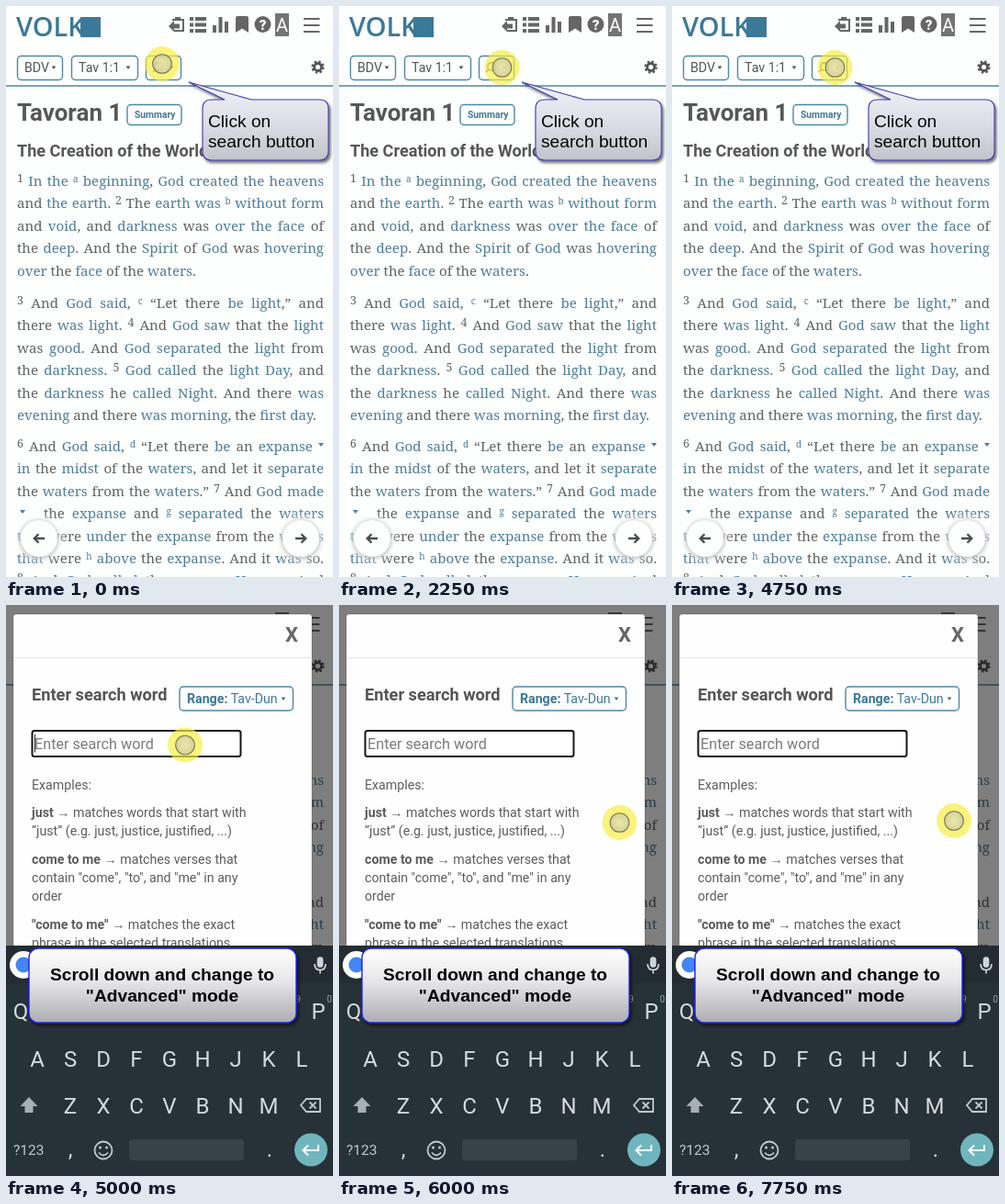
Recreate the animation shown at these times as an HTML page. Size 356 by 622 pixels, loop 8000 ms.

```html
<!DOCTYPE html>
<html lang="en">
<head>
<meta charset="utf-8">
<title>Search walkthrough</title>
<style>
html, body { margin: 0; width: 100%; height: 100%; overflow: hidden; background: #fff; }
#stage { position: relative; width: 356px; height: 622px; overflow: hidden; background: #fdfefe; }
svg { position: absolute; left: 0; top: 0; width: 356px; height: 622px; font-family: Roboto, sans-serif; }
.row {
  position: absolute; left: 12px; width: 334px; height: 24.4px;
  font: 15.1px/24.4px "Noto Serif", serif; color: #626262;
  white-space: nowrap; text-align: justify; text-align-last: justify;
}
.row.end { text-align-last: left; }
.row b { font-weight: 400; color: #4f7e97; }
.row sup { font-size: 12.5px; line-height: 0; vertical-align: 4px; }
.row sup.note { font-size: 10px; color: #4f7e97; }
.row i { display: inline-block; border: 3px solid transparent; border-top: 4px solid #4f7e97; border-bottom: 0; vertical-align: 5px; }
.row i.wide { margin: 0 12px 0 3px; }
.nav { position: absolute; top: 560px; width: 40px; height: 40px; border-radius: 50%; background: #fdfefe; box-shadow: 0 1px 5px 1px #0004, 0 0 8px 4px #fffc; }
.blue { fill: #3c7898; }
.btn { fill: none; stroke: #4f87a3; stroke-width: 1.4; }
.tip { font-family: "Liberation Sans", Arial, sans-serif; font-size: 19.2px; fill: #050505; }
.keys { font-size: 24px; fill: #d6dadd; text-anchor: middle; }
.help { font-size: 14.2px; fill: #5c5c5c; }
.bold { font-weight: 700; }
</style>
</head>
<body>
<div id="stage">
  <div id="verses"></div>
  <div class="nav" style="left:16px"></div>
  <div class="nav" style="left:301px"></div>

  <svg viewBox="0 0 356 622">
    <defs>
      <path id="drop" d="M-2.4 -1.5H2.4L0 2Z"/>
      <path id="arrow" d="M6 0H-5M-.5 -4.8L-5.3 0L-.5 4.8" fill="none" stroke="#4b4b4b" stroke-width="2.3"/>
      <linearGradient id="lilac" x2="0" y2="1">
        <stop stop-color="#f2f2fa"/><stop offset=".5" stop-color="#dedee8"/><stop offset="1" stop-color="#c3c3cb"/>
      </linearGradient>
      <linearGradient id="silver" x2="0" y2="1">
        <stop stop-color="#fff"/><stop offset=".45" stop-color="#e6e6e8"/><stop offset="1" stop-color="#adadb1"/>
      </linearGradient>
      <radialGradient id="knob">
        <stop stop-color="#e6e3bd"/><stop offset="1" stop-color="#c9c6a0"/>
      </radialGradient>
      <filter id="shade" x="-10%" y="-20%" width="125%" height="150%">
        <feDropShadow dx="2" dy="2.5" stdDeviation="1.6" flood-opacity=".55"/>
      </filter>
      <clipPath id="sheet"><path d="M8 10H333V371H8Z"/></clipPath>
    </defs>

    <use href="#arrow" x="36" y="580"/>
    <use href="#arrow" transform="translate(321 580) scale(-1 1)"/>

    <!-- header -->
    <text class="blue" x="11" y="33" font-family="Open Sans, sans-serif" font-size="29" font-weight="600">VOLK</text>
    <rect class="blue" x="81" y="12" width="22" height="22"/>
    <g fill="#666" stroke="#666" stroke-width="0">
      <path d="M181 14H184V12H190V14H194V28H183V26H192V16H181Z"/>
      <path d="M177 22L183 16V19.5H189V24.5H183V28Z"/>
      <path d="M200 12H204V16H200ZM206 12H218V16H206ZM200 18.5H204V22.5H200ZM206 18.5H218V22.5H206ZM200 25H204V29H200ZM206 25H218V29H206Z"/>
      <path d="M225 21H229V29H225ZM231.5 12H235.5V29H231.5ZM238 17H242V29H238Z"/>
      <path d="M250 13Q250 11 252 11H262Q264 11 264 13V29L257 24.5L250 29Z"/>
      <circle cx="279.5" cy="20" r="9"/>
      <rect x="293" y="8" width="15" height="25" fill="#747474"/>
      <path d="M324 14H341.5M324 21H341.5M324 28H341.5" stroke-width="2.2"/>
      <g fill="none" stroke="#555">
        <circle cx="339.5" cy="66.5" r="4" stroke-width="2.8"/>
        <circle cx="339.5" cy="66.5" r="6" stroke-width="2.2" stroke-dasharray="2.5 2.212"/>
      </g>
    </g>
    <g fill="#fff" text-anchor="middle">
      <text x="279.5" y="25.5" font-size="15" font-weight="800">?</text>
      <text x="300.5" y="27.5" font-size="20">A</text>
    </g>

    <g class="btn">
      <rect x="12.5" y="54.5" width="49" height="26" rx="4"/>
      <rect x="71.5" y="54.5" width="72" height="26" rx="4"/>
      <rect x="152.5" y="54.5" width="38" height="26" rx="4"/>
      <rect x="132" y="107.5" width="59" height="22" rx="4"/>
      <path d="M0 87H356" stroke-width="1.6"/>
    </g>
    <g fill="#555" font-size="14.2">
      <text x="20" y="72">BDV</text>
      <text x="79" y="72">Tav 1:1</text>
      <use href="#drop" x="52" y="67"/><use href="#drop" x="133" y="67"/><use href="#drop" x="180" y="67"/>
    </g>
    <g fill="none" stroke="#666" stroke-width="1.4">
      <circle cx="166" cy="66" r="4.2"/><path d="M163 69L160 72"/>
    </g>
    <text class="bold" x="12" y="125" font-size="26" fill="#575757">Tavoran 1</text>
    <text class="bold" x="140" y="122" font-size="10.3" fill="#457a95">Summary</text>
    <text class="bold" x="12" y="163.5" font-size="18.1" fill="#575757">The Creation of the World</text>

    <g id="page-tip">
      <path filter="url(#shade)" fill="url(#lilac)" stroke="#3d3da8" stroke-width="1.1"
        d="M224 102H238L199 83L267 102H341Q351 102 351 112V158Q351 168 341 168H224Q214 168 214 158V112Q214 102 224 102Z"/>
      <text class="tip" x="220" y="132">Click on</text>
      <text class="tip" x="220" y="153.5">search button</text>
    </g>

    <g id="modal" visibility="hidden">
      <rect width="356" height="622" fill="#000" opacity=".5"/>
      <rect x="8" y="10" width="325" height="380" rx="3" fill="#fefefe" stroke="#0003"/>
      <path d="M8 57.5H333" stroke="#e4e4e4"/>
      <text class="bold" x="311" y="40" font-size="22" fill="#666" text-anchor="middle">X</text>
      <text class="bold" x="28" y="104" font-size="18.2" fill="#555">Enter search word</text>
      <rect class="btn" x="189" y="89" width="123.5" height="26" rx="4"/>
      <text class="blue" x="197" y="107" font-size="14.2"><tspan class="bold">Range:</tspan> Tav-Dun</text>
      <use class="blue" href="#drop" x="302" y="102"/>
      <rect x="28.5" y="137" width="227" height="28" rx="2.5" fill="#fff" stroke="#151515" stroke-width="2"/>
      <text x="31" y="156.5" font-size="16.2" fill="#7a7a7a">Enter search word</text>
      <path id="caret" d="M31.5 141V160.5" stroke="#333" stroke-width="1.2"/>
      <g class="help" clip-path="url(#sheet)">
        <text x="28" y="201">Examples:</text>
        <text x="28" y="231"><tspan class="bold">just</tspan> → matches words that start with</text>
        <text x="28" y="251">“just” (e.g. just, justice, justified, ...)</text>
        <text x="28" y="282"><tspan class="bold">come to me</tspan> → matches verses that</text>
        <text x="28" y="302">contain "come", "to", and "me" in any</text>
        <text x="28" y="322">order</text>
        <text x="28" y="353"><tspan class="bold">"come to me"</tspan> → matches the exact</text>
        <text x="28" y="373">phrase in the selected translations</text>
      </g>

      <!-- keyboard -->
      <rect y="371" width="356" height="251" fill="#263138"/>
      <rect y="371" width="356" height="41" fill="#222c32"/>
      <circle cx="19" cy="392" r="15" fill="#fff"/>
      <circle cx="19" cy="392" r="8.5" fill="#4285f4"/>
      <g fill="none" stroke="#d0d4d7" stroke-width="1.7">
        <rect x="339.5" y="384" width="5" height="10" rx="2.5" fill="#d0d4d7"/>
        <path d="M336 391Q336 397.5 342 397.5T348 391M342 397.5V401.5"/>
      </g>
      <g class="keys" id="keys"></g>
      <g fill="#9ba3a8" font-size="10" text-anchor="middle">
        <text x="318" y="433">9</text><text x="352" y="433">0</text>
      </g>
      <path d="M25 536L34.5 546H29.5V553H20.5V546H15.5Z" fill="#a9b0b4"/>
      <g fill="none" stroke="#c3c9cc" stroke-width="1.8">
        <path d="M327 538H342V552H327L321 545ZM330.5 541.5L337.5 548.5M337.5 541.5L330.5 548.5"/>
        <circle cx="106" cy="594" r="9.5"/>
        <path d="M101 596.5Q106 602.5 111 596.5"/>
      </g>
      <g fill="#c3c9cc">
        <circle cx="102.5" cy="591" r="1.5"/><circle cx="109.5" cy="591" r="1.5"/>
        <text x="8" y="599" font-size="15.5">?123</text>
      </g>
      <rect x="134" y="582" width="125" height="23" rx="3" fill="#374249"/>
      <circle cx="332" cy="593.5" r="18" fill="#70b5bd"/>
      <path d="M340 588V594H324M329 588.5L323.5 594L329 599.5" fill="none" stroke="#fff" stroke-width="2"/>

      <rect filter="url(#shade)" x="25" y="374" width="291" height="81" rx="10" fill="url(#silver)" stroke="#2020e8" stroke-width="1.4"/>
      <g class="tip bold" text-anchor="middle">
        <text x="170" y="409">Scroll down and change to</text>
        <text x="170" y="432">"Advanced" mode</text>
      </g>
    </g>

    <g id="dot" transform="translate(170 63)">
      <circle r="19" fill="#f8ef42" opacity=".68"/>
      <circle r="10.3" fill="url(#knob)" fill-opacity=".72" stroke="#77755d" stroke-width="1.1"/>
    </g>
  </svg>
</div>

<script>
const $ = id => document.getElementById(id);

// [word] = linked word, ^x = note mark, #n = verse number, ~ = small triangle
const paragraphs = [
  [178, [
    "#1 [In the] ^a [beginning], [God] [created] [the heavens]",
    "and [the earth]. #2 The [earth] [was] ^b [without form]",
    "and [void], and [darkness] was [over] [the face] of",
    "the [deep]. And the [Spirit] of [God] was [hovering]",
    "[over] the [face] of the [waters]."]],
  [311, [
    "#3 And [God] [said], ^c “Let there [be] [light],” and",
    "there [was] [light]. #4 And [God] [saw] that the [light]",
    "was [good]. And [God] [separated] the [light] from",
    "the [darkness]. #5 [God] [called] the [light] [Day], and",
    "the [darkness] he [called] [Night]. And there [was]",
    "[evening] and there [was] [morning], the [first] [day]."]],
  [467, [
    "#6 And [God] [said], ^d “Let there [be] an [expanse] ~",
    "[in] the [midst] of the [waters], and let it [separate]",
    "the [waters] from the [waters].” #7 And [God] [made]",
    "~~the [expanse] and ^g [separated] the [waters]",
    "[that] were [under] the [expanse] from the [waters]",
    "[that] were ^h [above] the [expanse]. And it [was] so.",
    "#8 And [God] [called] the [expanse] [Heaven]. And"]]
];
const markup = s => s
  .replace(/\[(.+?)\]/g, "<b>$1</b>")
  .replace(/#(\d)/g, "<sup>$1</sup>")
  .replace(/\^(\w)/g, '<sup class="note">$1</sup>')
  .replace(/~~/g, '<i class="wide"></i> ')
  .replace(/~/g, "<i></i>");

$("verses").innerHTML = paragraphs.map(([top, rows], p) =>
  rows.map((s, i) => {
    const end = p < 2 && i === rows.length - 1 ? " end" : "";
    return `<div class="row${end}" style="top:${top + i * 24.4}px">${markup(s)}</div>`;
  }).join("")).join("");

const keyRow = (chars, x, y) => [...chars].map((c, i) =>
  `<text x="${x + i * 36}" y="${y}">${c}</text>`).join("");
$("keys").innerHTML =
  keyRow("QWERTYUIOP", 16, 451) + keyRow("ASDFGHJKL", 34, 502.5) +
  keyRow("ZXCVBNM", 70, 553.5) + keyRow(",", 70, 601) + keyRow(".", 287, 601);

const LOOP = 8000, OPEN = 5000;
const dotPath = [
  [0, 170, 63], [250, 170.5, 63], [500, 178, 66.5], [750, 177.5, 67],
  [5000, 195, 152.5], [5250, 248.5, 173], [5500, 286.5, 197], [5750, 297, 212],
  [6000, 305.5, 237], [7000, 307, 236], [7250, 307, 235]
];
const caretFlips = [5750, 6250, 6750, 7000, 7500];
const start = performance.now();

function draw() {
  const t = Math.max(0, performance.now() - start) % LOOP;
  const open = t >= OPEN;
  const [, x, y] = dotPath.filter(p => p[0] <= t).pop();
  const flips = caretFlips.filter(f => f <= t).length;
  $("dot").setAttribute("transform", `translate(${x} ${y})`);
  $("page-tip").setAttribute("visibility", open ? "hidden" : "visible");
  $("modal").setAttribute("visibility", open ? "visible" : "hidden");
  $("caret").setAttribute("opacity", flips % 2 ? 0 : 1);
  requestAnimationFrame(draw);
}
draw();
</script>
</body>
</html>
```
